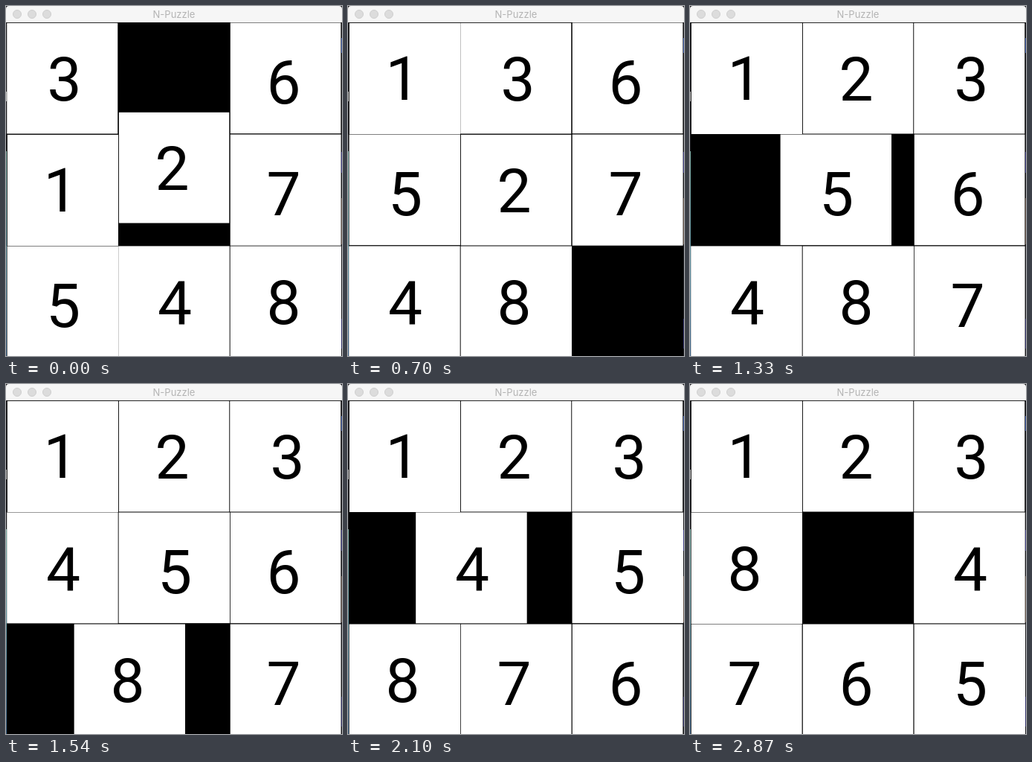
Write an HTML page with a canvas that moves like this. It is 452 px wide and 470 px high and loops after 3360 ms.

```html
<!DOCTYPE html>
<html lang="en">
<head>
<meta charset="utf-8">
<title>N-Puzzle</title>
<style>
  html, body { margin: 0; width: 100%; height: 100%; overflow: hidden; background: #fff; }
  canvas { display: block; }
</style>
</head>
<body>
<canvas id="stage" width="452" height="470"></canvas>
<script>
const ctx = document.getElementById('stage').getContext('2d');

const LOOP = 3360, TICK = 70, LAST_TICK = 41;
const SIZE = 150, LEFT = 1, TOP = 22;
const STEPS_PER_MOVE = 5, STEPS_PER_TICK = 2.63;

// Start board, row by row (0 is the gap), and the tiles pushed into the gap in turn.
const START = [3, 2, 6, 1, 0, 7, 5, 4, 8];
const MOVES = [2, 3, 1, 5, 4, 8, 7, 6, 3, 2, 5, 4, 8, 7, 6, 5, 4, 8, 7, 6, 5, 4];

// Centre of each digit within its tile, and edge darkness: left, top, right, bottom.
const TILES = {
  1: { centre: [67.5, 74.5], edges: [.85, .9, 0, 0] },
  2: { centre: [73, 75], edges: [.9, .85, .7, .5] },
  3: { centre: [76.5, 75.5], edges: [.25, .85, .75, .5] },
  4: { centre: [76.5, 76], edges: [.2, .4, .3, .6] },
  5: { centre: [77.5, 80.5], edges: [.6, .5, 0, .85] },
  6: { centre: [73.5, 80.5], edges: [.8, .5, .6, .8] },
  7: { centre: [72.5, 79.5], edges: [.75, .5, .4, .3] },
  8: { centre: [72.5, 76], edges: [.65, .5, 0, 0] }
};

function rect(color, x, y, w, h) {
  ctx.fillStyle = color;
  ctx.fillRect(x, y, w, h);
}

function drawDesktop() {
  const glow = ctx.createLinearGradient(0, 195, 0, 470);
  glow.addColorStop(0, '#7fb0a8');
  glow.addColorStop(.6, '#5d8ea0');
  glow.addColorStop(1, '#3f6488');
  rect('#1c1c20', 0, 0, 452, 470);
  rect('#b8b8b8', 0, 115, 1, 13);
  rect(glow, 0, 195, 1, 275);
  rect('#4a68b4', 451, 43, 1, 20);
  rect('#45458a', 451, 196, 1, 28);
  rect('#6b5a50', 451, 258, 1, 62);
  rect('#34346c', 451, 420, 1, 40);
}

function drawTitleBar() {
  ctx.fillStyle = '#f6f6f6';
  ctx.beginPath();
  ctx.roundRect(0, 0, 452, TOP, [4, 4, 0, 0]);
  ctx.fill();
  for (const x of [15, 35, 55]) {
    ctx.beginPath();
    ctx.arc(x, 11, 5.5, 0, 2 * Math.PI);
    ctx.fillStyle = '#dcdcdc';
    ctx.fill();
    ctx.strokeStyle = '#cfcfcf';
    ctx.lineWidth = 1;
    ctx.stroke();
  }
  ctx.font = '13px Inter, sans-serif';
  ctx.textAlign = 'center';
  ctx.fillStyle = '#b4b4b4';
  ctx.fillText('N-Puzzle', 226, 16);
}

function drawTile(number, x, y) {
  const { centre, edges } = TILES[number];
  const far = SIZE - 1;
  rect('#fff', x, y, SIZE, SIZE);
  [[0, 0, 1, SIZE], [0, 0, SIZE, 1], [far, 0, 1, SIZE], [0, far, SIZE, 1]]
    .forEach(([dx, dy, w, h], i) => rect(`rgba(0,0,0,${edges[i]})`, x + dx, y + dy, w, h));

  ctx.font = '82px Roboto, sans-serif';
  ctx.textAlign = 'left';
  ctx.fillStyle = '#000';
  const ink = ctx.measureText(number);
  ctx.fillText(number,
    x + centre[0] - (ink.actualBoundingBoxRight - ink.actualBoundingBoxLeft) / 2,
    y + centre[1] + (ink.actualBoundingBoxAscent - ink.actualBoundingBoxDescent) / 2);
}

function drawBoard(steps) {
  const board = [...START];
  const done = Math.floor(steps / STEPS_PER_MOVE);
  const part = steps % STEPS_PER_MOVE / STEPS_PER_MOVE;
  for (const number of MOVES.slice(0, done)) {
    const from = board.indexOf(number), gap = board.indexOf(0);
    board[gap] = number;
    board[from] = 0;
  }
  const gap = board.indexOf(0);
  const column = cell => cell % 3, row = cell => Math.floor(cell / 3);

  rect('#000', LEFT, TOP, 3 * SIZE, 3 * SIZE);
  board.forEach((number, cell) => {
    if (!number) return;
    const shift = number === MOVES[done] ? part : 0;
    const place = axis => Math.round(SIZE * (axis(cell) + (axis(gap) - axis(cell)) * shift));
    drawTile(number, LEFT + place(column), TOP + place(row));
  });
}

function render(now) {
  const tick = Math.min(LAST_TICK, Math.floor(now % LOOP / TICK));
  const steps = 4 + Math.floor(tick * STEPS_PER_TICK + .4);
  drawDesktop();
  drawTitleBar();
  drawBoard(Math.min(steps, MOVES.length * STEPS_PER_MOVE));
}

const start = performance.now();
function loop() {
  render(performance.now() - start);
  requestAnimationFrame(loop);
}
loop();
</script>
</body>
</html>
```
